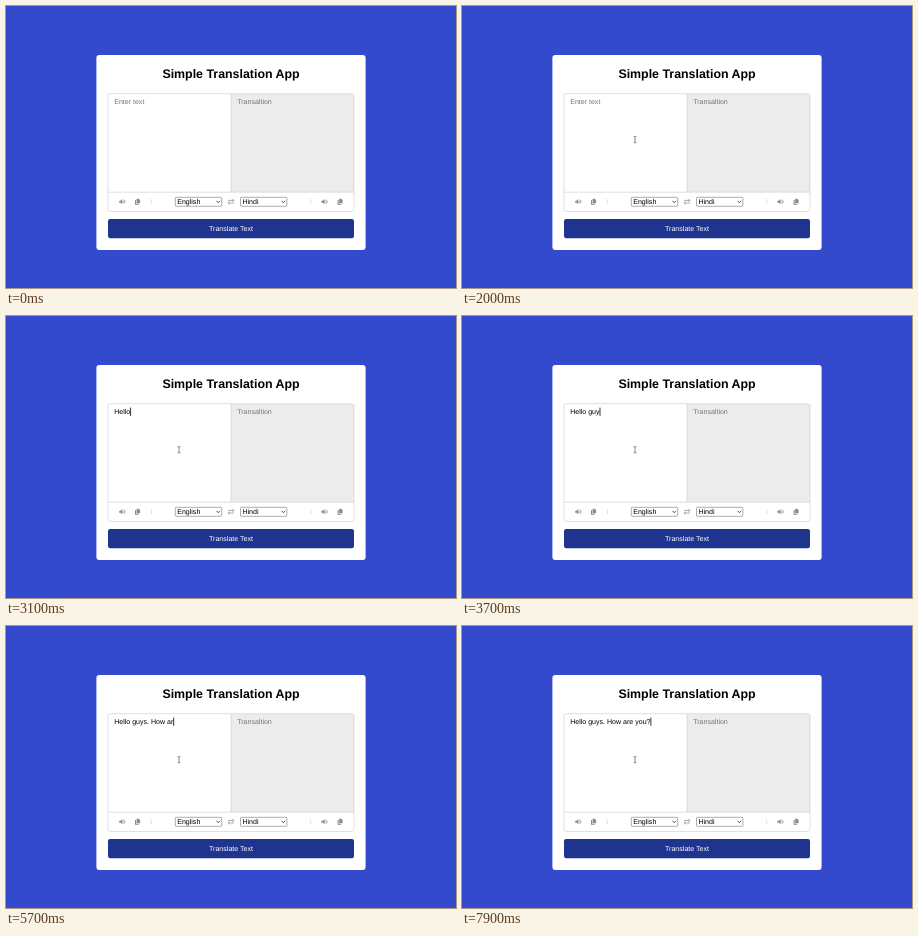
These frames come from a looping animation (450 by 282 pixels, 8 s). An HTML page:

```html
<!DOCTYPE html>
<html lang="en">
<head>
<meta charset="utf-8">
<title>Translation app</title>
<style>
  html, body { margin: 0; width: 100%; height: 100%; overflow: hidden; background: #344acd; }
  svg { display: block; width: 450px; height: 282px; }
  text { font: 7.05px "Liberation Sans", Arial, sans-serif; text-rendering: geometricPrecision; white-space: pre; }
  .title { font-size: 12.4px; font-weight: bold; }
  .hint { fill: #757575; }
  .mid { text-anchor: middle; }
  .line { fill: none; stroke: #ccc; stroke-width: .6; }
  .icon { fill: #8c8c8c; }
  .stroke { fill: none; stroke: #8c8c8c; stroke-width: .7; }
  .box { fill: #fff; stroke: #767676; stroke-width: .6; }
</style>
</head>
<body>
<svg viewBox="0 0 450 282">
  <defs>
    <g id="speaker">
      <path class="icon" d="M-3-1h1.3L.2-2.6v5.2L-1.7 1H-3z"/>
      <path class="stroke" d="M1.1-1.1q.9 1.1 0 2.2M2-2q1.8 2 0 4"/>
    </g>
    <g id="copy">
      <path class="icon" d="M-.9-3h2.1L2.6-1.6v3.2H-.9z"/>
      <path class="icon" d="M-2.5-1.7h1.1v3.8h2.7V3h-3.8z"/>
    </g>
    <g id="select">
      <rect class="box" x=".3" y=".3" width="46.4" height="9" rx=".9"/>
      <path d="M41.4 3.8l1.8 1.9 1.8-1.9" fill="none" stroke="#222" stroke-width=".8"/>
    </g>
  </defs>

  <rect x="90.4" y="49" width="269.2" height="195" rx="3" fill="#fff"/>
  <text class="title mid" x="225" y="72.4">Simple Translation App</text>

  <path d="M225 88h121q2 0 2 2v96h-123z" fill="#ececec"/>
  <rect class="line" x="102" y="87.7" width="246" height="117.8" rx="2.2"/>
  <path class="line" d="M225 88v98M102 186.2h246M145.3 193.2v5M304.7 193.2v5"/>
  <text class="hint" x="231.2" y="98.2">Transaltion</text>
  <text class="hint" id="hint" x="108.2" y="98.2">Enter text</text>
  <text id="typed" x="108.2" y="98.2"></text>
  <rect id="caret" y="91.6" width=".8" height="8.2"/>

  <use href="#speaker" x="116.2" y="195.7"/>
  <use href="#copy" x="131.5" y="195.7"/>
  <use href="#speaker" x="318.4" y="195.7"/>
  <use href="#copy" x="334" y="195.7"/>
  <use href="#select" x="169" y="191"/>
  <use href="#select" x="234.2" y="191"/>
  <text x="171.2" y="198.2">English</text>
  <text x="236.4" y="198.2">Hindi</text>
  <path class="stroke" d="M222 194.4h5.8m-1.5-1.5l1.5 1.5-1.5 1.5M228 197h-5.8m1.5-1.5l-1.5 1.5 1.5 1.5"/>

  <rect x="102" y="213" width="246" height="19.3" rx="2.2" fill="#1f348f"/>
  <text class="mid" x="225" y="225.1" fill="#fff">Translate Text</text>

  <g id="pointer">
    <path id="arrow" d="M0 0v8.6l2-1.8 1.4 3.1 1.3-.6-1.4-3h2.7z" fill="#fff" stroke="#000" stroke-width=".5"/>
    <path id="beam" d="M-1.4-3.2q1.4 0 1.4.8v4.8q0 .8-1.4.8M1.4-3.2q-1.4 0-1.4.8M1.4 3.2q-1.4 0-1.4-.8" fill="none" stroke="#555" stroke-width=".7"/>
  </g>
</svg>
<script>
  const LOOP = 8000, STEP = 100, BLINK = 400;
  const MESSAGE = "Hello guys. How are you?";
  // Moment at which each character of the message is present
  const KEYS = [2400, 2600, 2800, 2900, 3100, 3300, 3500, 3700, 3700, 4100, 4400, 4600,
                4700, 4900, 5200, 5400, 5500, 5700, 5800, 6100, 6400, 6500, 6600, 7200];
  const FOCUS = 1600;
  const MOVE = { start: 1100, end: 1700, from: [76, 261], to: [173, 133.7] };
  const $ = id => document.getElementById(id);
  const show = (id, on) => $(id).setAttribute("visibility", on ? "inherit" : "hidden");

  function caretOn(t, count) {
    if (t < FOCUS) return false;
    if (t >= 6900 && t < 7200) return false;
    if (t >= 7500) return t >= 7900;
    const since = t - (count ? KEYS[count - 1] : FOCUS);
    return count ? true : since < BLINK;
  }

  function drawPointer(t) {
    const p = Math.min(1, Math.max(0, (t - MOVE.start) / (MOVE.end - MOVE.start)));
    const ease = p * p * (3 - 2 * p);
    const [x, y] = MOVE.from.map((a, i) => a + (MOVE.to[i] - a) * ease);
    const overInput = x > 102 && y < 186;
    $("pointer").setAttribute("transform", `translate(${x} ${y})`);
    show("pointer", t >= MOVE.start);
    show("arrow", !overInput && t >= MOVE.start);
    show("beam", overInput);
  }

  function draw(now) {
    const t = Math.floor(now % LOOP / STEP) * STEP;
    const count = KEYS.filter(k => k <= t).length;
    $("typed").textContent = MESSAGE.slice(0, count);
    show("hint", !count);
    $("caret").setAttribute("x", 108.2 + (count ? $("typed").getComputedTextLength() : 0));
    show("caret", caretOn(t, count));
    drawPointer(t);
  }

  const begin = performance.now();
  function tick() {
    draw(performance.now() - begin);
    requestAnimationFrame(tick);
  }
  tick();
</script>
</body>
</html>
```
